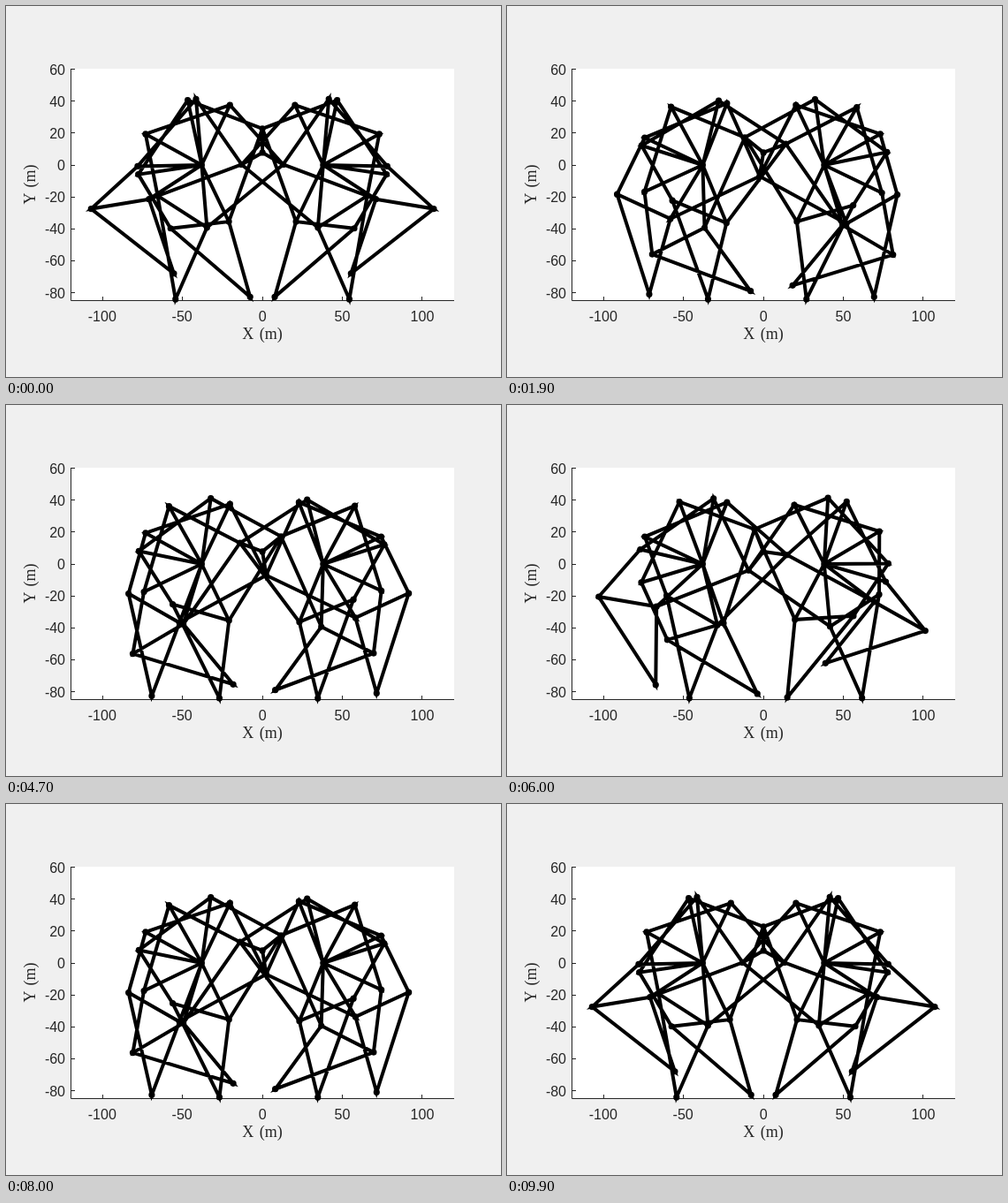
Write an HTML page that moves like this. It is 560 px wide and 420 px high and loops after 10000 ms.

```html
<!DOCTYPE html>
<html lang="en">
<head>
<meta charset="utf-8">
<title>Walking linkage</title>
<style>
  html, body { margin: 0; width: 100%; height: 100%; overflow: hidden; background: #f0f0f0; }
  svg { display: block; width: 560px; height: 420px; }
  text { fill: #262626; text-anchor: middle; }
  .tick { font: 16px "Liberation Sans", Arial, sans-serif; }
  .y { text-anchor: end; }
  .name { font: 18px "Liberation Serif", "Times New Roman", serif; word-spacing: 2px; }
  path { fill: none; stroke: #000; }
  #axes { stroke: #262626; stroke-width: 1; }
  #bars { stroke-width: 4; }
  #joints { stroke-width: 7.2; stroke-linecap: round; }
</style>
</head>
<body>
<svg viewBox="0 0 560 420">
  <rect x="73" y="71" width="434" height="262.5" fill="#fff"/>
  <path id="axes"/>
  <g id="labels"></g>
  <text class="name" x="290" y="377">X (m)</text>
  <text class="name" transform="translate(33 202) rotate(-90)">Y (m)</text>
  <path id="bars"/>
  <path id="joints"/>
</svg>
<script>
const SCALE = 1.8083, X0 = 290.1, Y0 = 180;
const STEP = 100, STEPS = 100;
const CRANK = 15, HUB = [0, 7.8], PIVOT = [38, 0];
const $ = id => document.getElementById(id);
const px = x => X0 + x * SCALE;
const py = y => Y0 - y * SCALE;

function drawAxes() {
  const snap = v => Math.floor(v) + 0.5;
  let d = "M73.5 71V333.5H507", labels = "";
  for (let x = -100; x <= 100; x += 50) {
    d += `M${snap(px(x))} 333.5v-4.5`;
    labels += `<text class="tick" x="${px(x) - (x < 0 ? 0.5 : 0)}" y="356.5">${x}</text>`;
  }
  for (let y = -80; y <= 60; y += 20) {
    d += `M73.5 ${snap(py(y))}h4.5`;
    labels += `<text class="tick y" x="67" y="${py(y) + 6}">${y}</text>`;
  }
  $("axes").setAttribute("d", d);
  $("labels").innerHTML = labels;
}

// Point at distance r from p and s from q; side 1 is left of p→q, -1 right.
function meet(p, r, q, s, side) {
  const dx = q[0] - p[0], dy = q[1] - p[1], d = Math.hypot(dx, dy);
  const a = (r * r - s * s + d * d) / (2 * d);
  const h = side * Math.sqrt(Math.max(0, r * r - a * a));
  return [p[0] + (a * dx - h * dy) / d, p[1] + (a * dy + h * dx) / d];
}

// One leg on the right side; dir = -1 mirrors it to the left.
function leg(angle, dir) {
  const pin = [dir * CRANK * Math.cos(angle), HUB[1] + CRANK * Math.sin(angle)];
  const top = meet(pin, 50, PIVOT, 41.5, 1);
  const low = meet(pin, 61.9, PIVOT, 39.3, -1);
  const out = meet(top, 55.8, PIVOT, 40.1, 1);
  const knee = meet(out, 39.4, low, 36.7, 1);
  const foot = meet(knee, 65.7, low, 49, 1);
  const at = p => px(dir * p[0]).toFixed(2) + " " + py(p[1]).toFixed(2);
  const line = (...pts) => "M" + pts.map(at).join("L");
  return {
    bars: line(HUB, pin, top, PIVOT, low, pin) + line(top, out, PIVOT) +
          line(out, knee, low, foot, knee),
    joints: [HUB, pin, PIVOT, top, low, out, knee, foot].map(p => `M${at(p)}h0.01`).join("")
  };
}

function draw(now) {
  const step = Math.floor(now / STEP) % STEPS;
  const turn = Math.PI / 2 - 2 * Math.PI * step / (STEPS - 1);
  let bars = "", joints = "";
  for (let i = 0; i < 3; i++) {
    for (const dir of [1, -1]) {
      const part = leg(turn + i * 2 * Math.PI / 3, dir);
      bars += part.bars;
      joints += part.joints;
    }
  }
  $("bars").setAttribute("d", bars);
  $("joints").setAttribute("d", joints);
}

function loop() {
  draw(performance.now());
  requestAnimationFrame(loop);
}

drawAxes();
loop();
</script>
</body>
</html>
```
